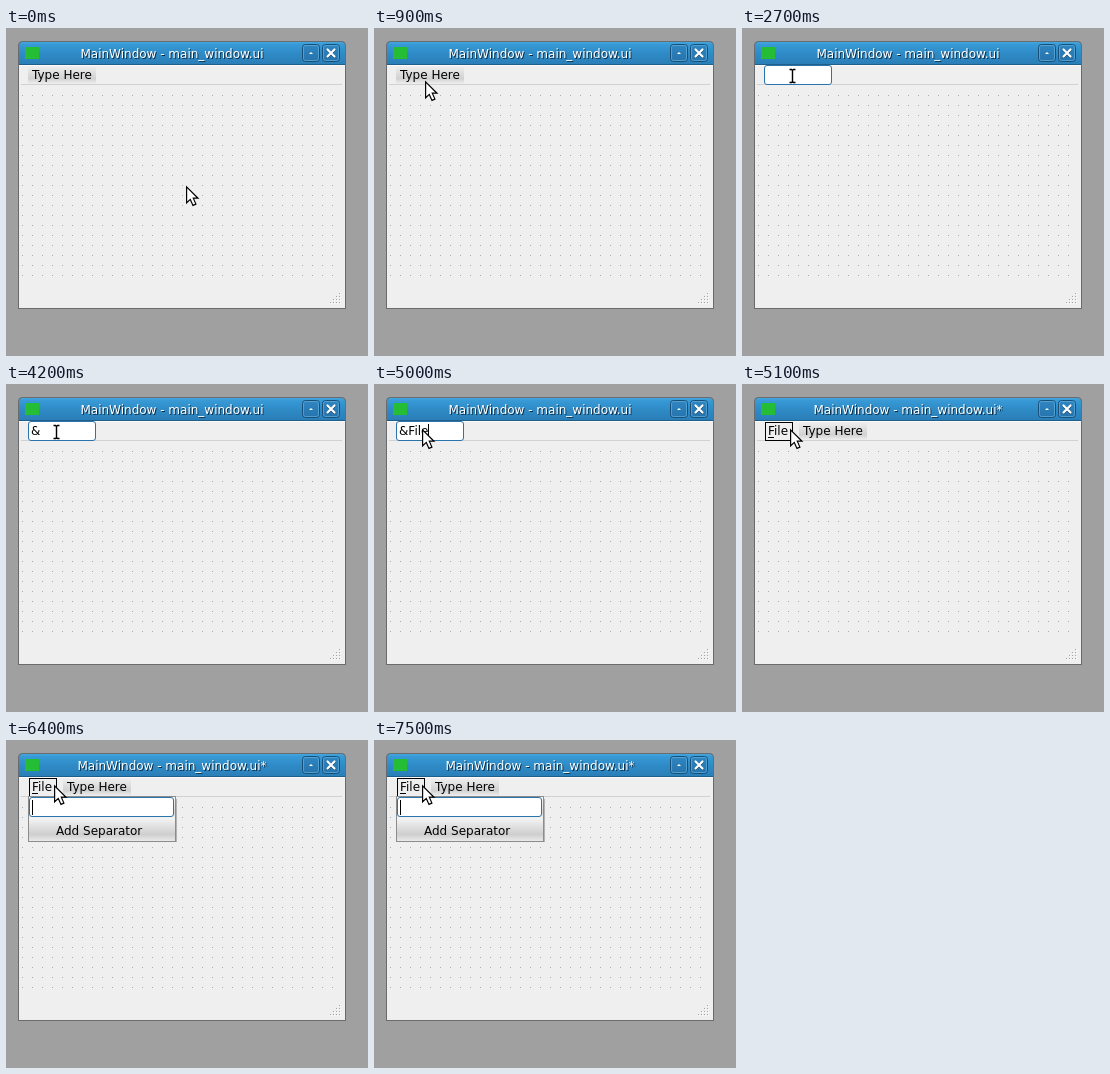
Recreate the animation shown at these times as an HTML page. Size 362x328 px, loop 8 s.

```html
<!DOCTYPE html>
<html lang="en">
<head>
<meta charset="utf-8">
<title>Menu editing</title>
<style>
  html, body { margin: 0; width: 100%; height: 100%; overflow: hidden; background: #a0a0a0; }
  svg { display: block; width: 362px; height: 328px; }
  text { font: 12px "DejaVu Sans", Verdana, sans-serif; fill: #000; white-space: pre; }
  .title { text-anchor: middle; fill: #fff; }
  .shade { text-anchor: middle; fill: #0b2f4a; }
  .crisp { shape-rendering: crispEdges; }
</style>
</head>
<body>
<svg viewBox="0 0 362 328">
  <defs>
    <linearGradient id="bar" x2="0" y2="1">
      <stop offset="0" stop-color="#43a6de"/><stop offset=".12" stop-color="#3799d5"/>
      <stop offset=".5" stop-color="#2f8bc6"/><stop offset="1" stop-color="#2a7db6"/>
    </linearGradient>
    <linearGradient id="btn" x2="0" y2="1">
      <stop offset="0" stop-color="#2f86c2"/><stop offset="1" stop-color="#2673ac"/>
    </linearGradient>
    <linearGradient id="slot" x2="0" y2="1">
      <stop offset="0" stop-opacity="0"/><stop offset=".7" stop-opacity=".125"/>
      <stop offset="1" stop-opacity="0"/>
    </linearGradient>
    <linearGradient id="sheet" x2="0" y2="1">
      <stop offset="0" stop-color="#fbfbfb"/><stop offset="1" stop-color="#e9e9e9"/>
    </linearGradient>
    <pattern id="dots" x="16" y="57" width="10" height="10" patternUnits="userSpaceOnUse">
      <rect width="1" height="1" fill="#a8a8a8"/>
    </pattern>
  </defs>

  <rect width="362" height="328" fill="#a0a0a0"/>
  <path d="M12 281V18q0-5 5-5H335q5 0 5 5V281z" fill="#686c6f"/>
  <path d="M13 37V18q0-4 4-4H335q4 0 4 4V37z" fill="url(#bar)"/>
  <path class="crisp" d="M13 36h326v1H13z" fill="#205f8c"/>
  <path class="crisp" d="M13 37h326v243H13z" fill="#efefef"/>
  <path class="crisp" d="M13 37h326v1H13z" fill="#fafafa"/>
  <path class="crisp" d="M15 56h321v1H15z" fill="#d2d2d2"/>
  <rect class="crisp" x="14" y="58" width="316" height="191" fill="url(#dots)"/>
  <g id="grip" class="crisp"></g>
  <rect x="19" y="19" width="14" height="12" fill="#25bd35"/>

  <g fill="url(#btn)" stroke="#174f79">
    <rect x="296.5" y="16.5" width="17" height="17" rx="3"/>
    <rect x="316.5" y="16.5" width="17" height="17" rx="3"/>
  </g>
  <g fill="none" stroke="#68b3df" stroke-opacity=".65">
    <rect x="297.5" y="17.5" width="15" height="15" rx="2"/>
    <rect x="317.5" y="17.5" width="15" height="15" rx="2"/>
  </g>
  <path d="M303 26l2-2 2 2z" fill="#fff"/>
  <path d="M321.5 22l7 7m0-7l-7 7" stroke="#103d5e" stroke-width="2.4" stroke-linecap="round"/>
  <path d="M321.5 21.5l7 7m0-7l-7 7" stroke="#fff" stroke-width="2.2" stroke-linecap="round"/>

  <text id="shade" class="shade" x="167" y="31"></text>
  <text id="title" class="title" x="166" y="30"></text>

  <g id="slotItem">
    <rect class="crisp" x="22" y="38" width="68" height="18" fill="url(#slot)"/>
    <text x="26" y="51">Type Here</text>
    <rect id="pick" class="crisp" x="23.5" y="38.5" width="66" height="18" fill="#00f" fill-opacity=".125" stroke="#0000e0"/>
  </g>
  <g id="fileItem">
    <text x="26" y="51">File</text>
    <path class="crisp" d="M26 53h6v1h-6z"/>
    <rect class="crisp" x="23.5" y="38.5" width="27" height="18" fill="none" stroke="#000"/>
  </g>

  <g id="edit">
    <rect x="22.5" y="37.5" width="67" height="19" rx="2.5" fill="#fff" stroke="#2b73ab"/>
    <text id="typed" x="25" y="51"></text>
  </g>

  <g id="popup">
    <path class="crisp" d="M24 102h147V59h-1v43z" fill="#000" opacity=".25"/>
    <rect class="crisp" x="22.5" y="56.5" width="147" height="45" fill="url(#sheet)" stroke="#8c8c8c"/>
    <rect class="crisp" x="23" y="57" width="146" height="21" fill="url(#slot)"/>
    <rect class="crisp" x="23" y="79" width="146" height="22" fill="url(#slot)"/>
    <text x="50" y="95">Add Separator</text>
    <g id="entry">
      <text x="50" y="72">Type Here</text>
      <rect class="crisp" x="23.5" y="57.5" width="144" height="19" fill="#00f" fill-opacity=".125" stroke="#0000e0"/>
    </g>
    <rect id="field" x="23.5" y="57.5" width="144" height="19" rx="2.5" fill="#fff" stroke="#2b73ab"/>
  </g>
  <rect id="caret" class="crisp" width="1" height="15"/>

  <path id="arrow" d="M.6.9V16.8L4.3 13.4 7 19.4 9.9 18.1 7.3 12.2H12z" fill="#fff" stroke="#000" stroke-width="1.2"/>
  <g id="beam" fill="none">
    <path d="M47 41.5h2.5l1 1 1-1H54M50.5 42v12M47 54.5h2.5l1-1 1 1H54" stroke="#fff" stroke-width="3"/>
    <path d="M47.5 41.5h2l1 1 1-1h2M50.5 42v12M47.5 54.5h2l1-1 1 1h2" stroke="#000" stroke-width="1.4"/>
  </g>
</svg>
<script>
  const LOOP = 8000;
  const $ = id => document.getElementById(id);
  const show = (id, on) => $(id).setAttribute('display', on ? 'inline' : 'none');

  // Latest value whose start time has passed.
  const at = (steps, t) => steps.reduce((v, s) => t >= s[0] ? s[1] : v, steps[0][1]);

  const path = [
    [0, [180, 158]], [300, [165, 146]], [400, [130, 117]], [500, [92, 86]],
    [600, [64, 63]], [700, [53, 54]], [900, [51, 53]], [1100, [49, 48]], [1200, [48, 45]]
  ];
  const typing = [[0, ''], [3700, '&'], [4300, '&F'], [4400, '&Fi'], [4600, '&File']];
  const blink = [
    [0, false], [2100, true], [2700, false], [3200, true], [4200, false], [4300, true],
    [5100, false], [6400, true], [7000, false], [7500, true]
  ];
  const caretX = { '': 25, '&': 34, '&F': 41, '&Fi': 44, '&File': 54 };

  let grip = '';
  for (let row = 0; row < 4; row++)
    for (let col = 3 - row; col < 4; col++) {
      const x = 324 + col * 3, y = 265 + row * 3;
      grip += `<rect x="${x + 1}" y="${y + 1}" width="1" height="1" fill="#fff"/>` +
              `<rect x="${x}" y="${y}" width="1" height="1" fill="#a5a5a5"/>`;
    }
  $('grip').innerHTML = grip;

  function draw(t) {
    const editing = t >= 1800 && t < 5100;
    const named = t >= 5100;
    const field = t >= 6400;
    const beam = t >= 1900 && t < 5000;
    const text = at(typing, t);

    const name = 'MainWindow - main_window.ui' + (named ? '*' : '');
    $('title').textContent = $('shade').textContent = name;

    show('slotItem', !editing);
    $('slotItem').setAttribute('transform', `translate(${named ? 35 : 0} 0)`);
    show('pick', t >= 1600 && t < 1800);
    show('fileItem', named);
    show('edit', editing);
    $('typed').textContent = text;

    show('popup', t >= 5200);
    show('entry', !field);
    show('field', field);

    show('caret', at(blink, t));
    $('caret').setAttribute('x', field ? 26 : caretX[text]);
    $('caret').setAttribute('y', field ? 60 : 40);

    show('beam', beam);
    show('arrow', !beam);
    $('arrow').setAttribute('transform', `translate(${at(path, t).join(' ')})`);
  }

  function tick() {
    draw(performance.now() % LOOP);
    requestAnimationFrame(tick);
  }
  tick();
</script>
</body>
</html>
```
